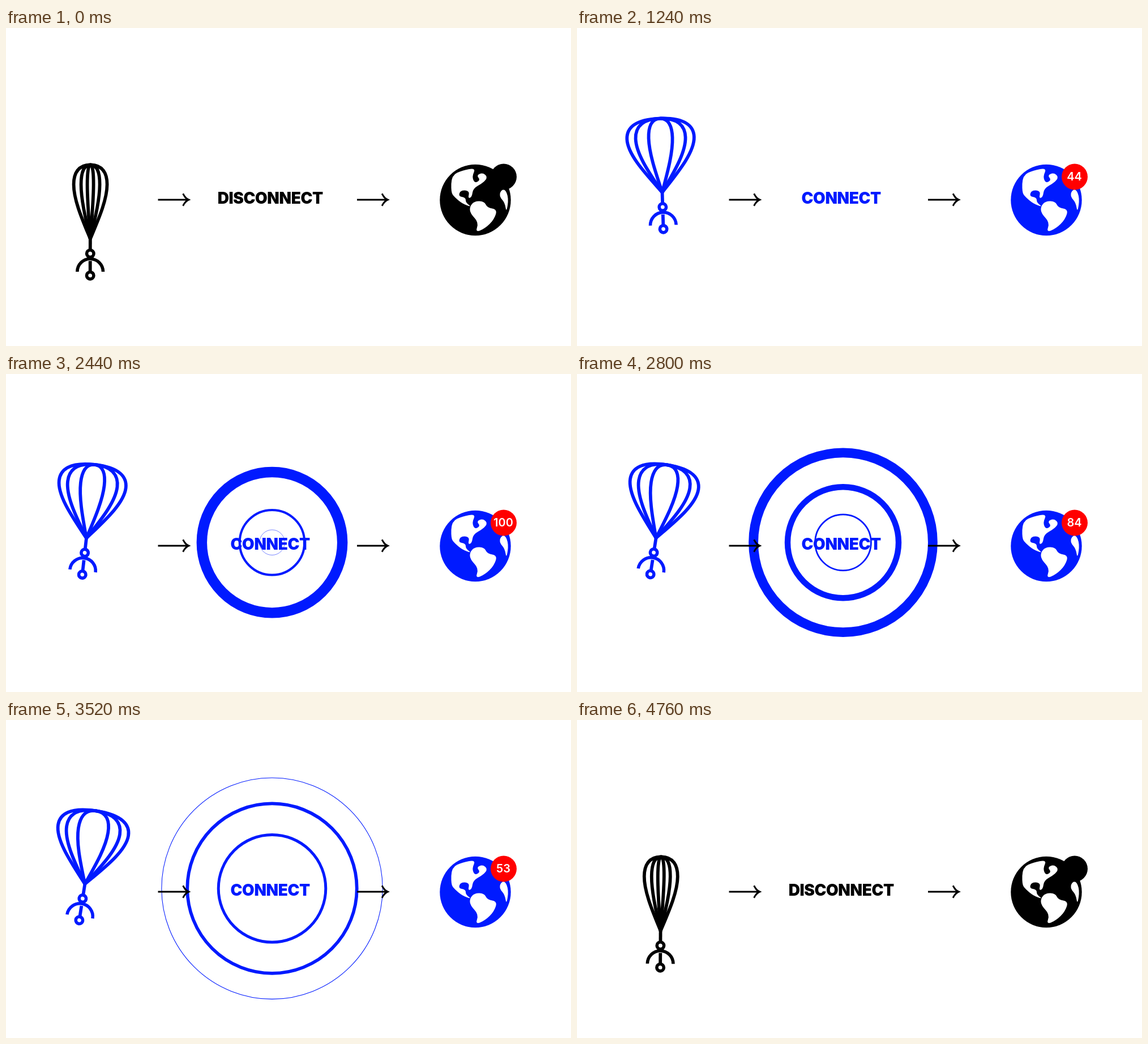
Animation of 998x561 px, one loop 4800 ms. Source, as an HTML page with a canvas:

```html
<!DOCTYPE html>
<html lang="en">
<head>
<meta charset="utf-8">
<title>Connect</title>
<style>
  html, body { margin: 0; width: 100%; height: 100%; overflow: hidden; background: #fff; }
  canvas { display: block; }
</style>
</head>
<body>
<canvas id="stage" width="998" height="561"></canvas>
<script>
const ctx = document.getElementById('stage').getContext('2d');
const LOOP = 4800, STEP = 40, TAU = Math.PI * 2;
const CONNECT_AT = 240, PEAK_AT = 2440, DISCONNECT_AT = 4680;

const rings = [
  { start: 1480, travel: 2160, life: 2160, reach: 196, weight: 18.5 },
  { start: 2090, travel: 1600, life: 1870, reach: 152, weight: 11.5 },
  { start: 2400, travel: 1450, life: 1760, reach: 101, weight: 5.4 }
];

// Rough outlines, rounded off when drawn.
const northAmerica = [[786, 290], [787, 260], [806, 251], [830, 247], [823, 262], [828, 274], [838, 268],
  [831, 260], [842, 255], [851, 263], [843, 273], [825, 283], [823, 298], [816, 301], [819, 287],
  [803, 286], [799, 297], [812, 299], [812, 308], [823, 316], [806, 310], [792, 298]];
const southAmerica = [[819, 315], [828, 305], [845, 306], [850, 317], [868, 320], [862, 338], [847, 353],
  [829, 361], [835, 343], [820, 327]];
const africa = [[873, 288], [881, 283], [888, 300], [884, 326], [881, 308], [872, 298]];

const clamp = x => Math.min(1, Math.max(0, x));
const mix = (a, b, u) => a + (b - a) * u;

function smooth(from, to, t) {
  const u = clamp((t - from) / (to - from));
  return u * u * (3 - 2 * u);
}

function disc(x, y, r, color) {
  ctx.fillStyle = color;
  ctx.beginPath();
  ctx.arc(x, y, r, 0, TAU);
  ctx.fill();
}

function arc(x, y, r, width, from = 0) {
  ctx.lineWidth = width;
  ctx.beginPath();
  ctx.arc(x, y, r, from, TAU);
  ctx.stroke();
}

function line(x1, y1, x2, y2) {
  ctx.beginPath();
  ctx.moveTo(x1, y1);
  ctx.lineTo(x2, y2);
  ctx.stroke();
}

function blob(points) {
  const mid = (a, b) => [(a[0] + b[0]) / 2, (a[1] + b[1]) / 2];
  ctx.beginPath();
  ctx.moveTo(...mid(points.at(-1), points[0]));
  points.forEach((p, i) => ctx.quadraticCurveTo(...p, ...mid(p, points[(i + 1) % points.length])));
  ctx.fill();
}

function rib(w) {
  ctx.beginPath();
  for (const side of [-w, w]) {
    ctx.moveTo(0, 290);
    ctx.bezierCurveTo(0.45 * side, 258, side, 222, side, 194);
    ctx.bezierCurveTo(side, 175, 0.75 * side, 159.5, 0, 159.5);
  }
  ctx.stroke();
}

function swing(t) {
  const phase = t / LOOP * TAU;
  const degrees = 3.15 - 6.27 * Math.cos(phase - 0.978) + 0.5 * Math.cos(3 * phase);
  return degrees * Math.PI / 180;
}

function drawBalloon(t, color) {
  const pivotY = 232;
  const lift = smooth(0, 440, t) - smooth(4400, 4750, t);
  const open = smooth(0, 440, t) - smooth(4240, 4740, t);
  const puff = smooth(2440, 3200, t) * open;
  ctx.save();
  ctx.translate(149 - t / LOOP, pivotY + mix(82, 0, lift));
  ctx.rotate(swing(t));
  ctx.translate(0, -pivotY);
  ctx.strokeStyle = color;
  ctx.lineWidth = 5.8;
  rib(mix(29.5, 59.3, open) + 3.5 * puff);
  rib(mix(16.5, 44, open) + 3.5 * puff);
  rib(mix(5.5, 21, open) + 5.5 * puff);
  line(0, 289, 0, 309);
  line(0, 329, 0, 348);
  arc(0, 348, 22.8, 5.6, Math.PI);
  arc(0, 316, 6.2, 5.6);
  arc(0, 354.7, 6.2, 5.6);
  ctx.restore();
}

function drawRings(t, color) {
  ctx.strokeStyle = color;
  for (const { start, travel, life, reach, weight } of rings) {
    const age = t - start;
    if (age < 0 || age > life) continue;
    const eased = Math.sin(Math.PI / 2 * clamp(age / travel) ** 1.12);
    const width = 0.5 + weight * Math.sin(Math.PI * age / life) ** 2;
    arc(470, 297.2, mix(20, reach, eased), width);
  }
}

function drawArrow(x) {
  ctx.save();
  ctx.translate(x, 303);
  ctx.strokeStyle = ctx.fillStyle = '#000';
  ctx.lineWidth = 2.8;
  line(0, 0, 55, 0);
  ctx.beginPath();
  for (const side of [-1, 1]) {
    ctx.moveTo(58, 0);
    ctx.quadraticCurveTo(49, 3 * side, 45.5, 11.5 * side);
    ctx.lineTo(42.8, 10 * side);
    ctx.quadraticCurveTo(46, 4 * side, 50, 0);
  }
  ctx.fill();
  ctx.restore();
}

function drawText(text, x, y, font, color) {
  ctx.font = font;
  ctx.textAlign = 'center';
  ctx.fillStyle = color;
  ctx.fillText(text, x, y);
}

function drawWord(word, color) {
  ctx.letterSpacing = '-0.4px';
  drawText(word, 466.7, 310, '900 28px Inter, sans-serif', color);
  ctx.letterSpacing = '0px';
}

function drawGlobe(t, color, connected) {
  disc(829, 303.5, 62.7, color);
  ctx.fillStyle = '#fff';
  [northAmerica, southAmerica, africa].forEach(blob);
  disc(879, 262.5, 23, connected ? '#f00' : color);
  if (!connected) return;
  const rate = t < PEAK_AT ? 0.0463 : 0.0433;
  const count = Math.max(0, Math.round(100 - Math.abs(t - PEAK_AT) * rate));
  drawText(count, 878.5, 269.3, '600 20px Inter, sans-serif', '#fff');
}

function draw(t) {
  const connected = t >= CONNECT_AT && t < DISCONNECT_AT;
  const color = connected ? '#001aff' : '#000';
  ctx.fillStyle = '#fff';
  ctx.fillRect(0, 0, 998, 561);
  drawRings(t, color);
  drawBalloon(t, color);
  drawArrow(268.5);
  drawArrow(620);
  drawWord(connected ? 'CONNECT' : 'DISCONNECT', color);
  drawGlobe(t, color, connected);
}

let start;
function tick(now) {
  start ??= now;
  draw(Math.floor((now - start) % LOOP / STEP) * STEP);
  requestAnimationFrame(tick);
}
draw(0);
requestAnimationFrame(tick);
</script>
</body>
</html>
```
